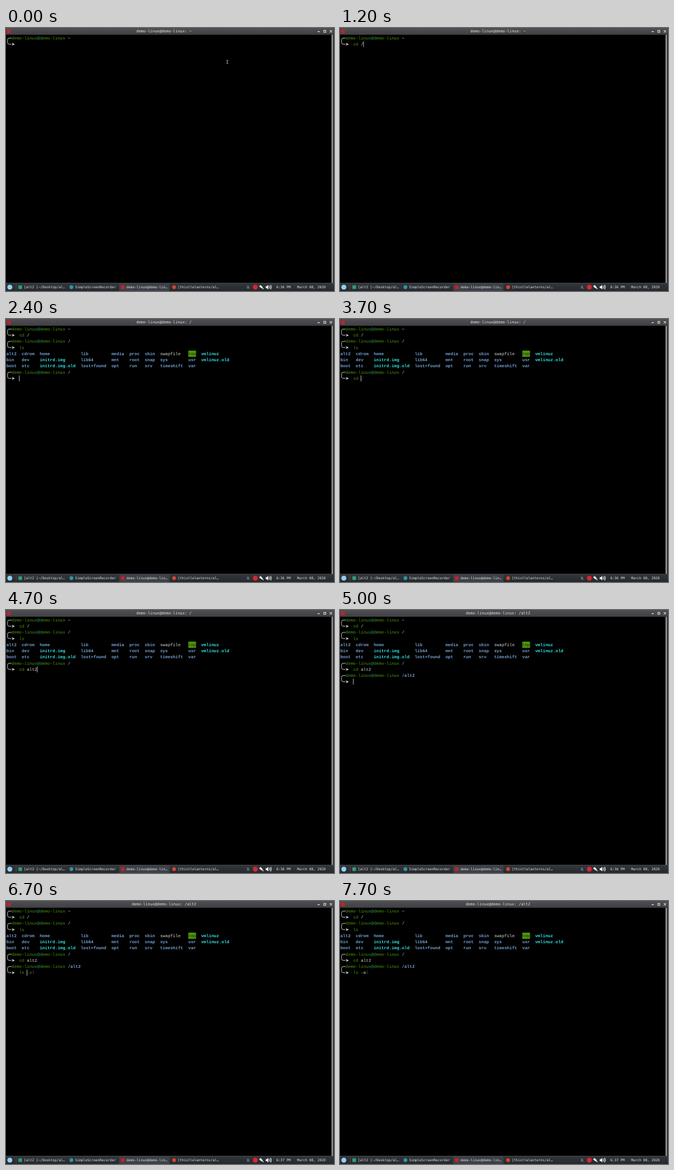
An HTML page that plays this animation: 600x480 px, repeating every 8 s.

```html
<!DOCTYPE html>
<html lang="en">
<head>
<meta charset="utf-8">
<title>Terminal session</title>
<style>
  html, body { margin: 0; width: 100%; height: 100%; overflow: hidden; background: #000; }
  svg { display: block; width: 600px; height: 480px; }
  text { white-space: pre; text-rendering: geometricPrecision; }
  .term { font: 7.8125px "Liberation Mono", monospace; }
  .title { font: 7.008px "DejaVu Sans Mono", monospace; fill: #e6e6e6; }
  .bar { font: 6.229px "DejaVu Sans Mono", monospace; fill: #e4e6e8; }
  .bold { font-weight: bold; }
</style>
</head>
<body>
<svg id="stage" viewBox="0 0 600 480" xmlns="http://www.w3.org/2000/svg">
  <defs>
    <linearGradient id="titleFill" x2="0" y2="1">
      <stop offset="0" stop-color="#505054"/><stop offset="1" stop-color="#3f3f43"/>
    </linearGradient>
    <linearGradient id="barFill" x2="0" y2="1">
      <stop offset="0" stop-color="#34383d"/><stop offset="1" stop-color="#25282c"/>
    </linearGradient>
  </defs>
  <rect width="600" height="480"/>
  <g id="terminal" class="term"></g>

  <rect width="600" height="12.4" fill="url(#titleFill)"/>
  <rect x="2" y="3" width="6.5" height="6.5" fill="#c8202c"/>
  <text id="title" class="title" x="289" y="8.4" text-anchor="middle"></text>
  <g fill="none" stroke="#f0f0f0">
    <path d="M570 6.6h4M592.4 4.2l4 4m0-4l-4 4" stroke-width="1.1"/>
    <rect x="581.4" y="4.3" width="3.6" height="3.6"/>
  </g>
  <rect x="595.4" y="12.4" width="3.4" height="453" fill="#8b8b8d"/>

  <rect y="465" width="600" height="15" fill="url(#barFill)"/>
  <rect y="465" width="600" height=".7" fill="#484c52"/>
  <rect x="207" y="466" width="92" height="14" fill="#3d4147"/>
  <circle cx="7" cy="473" r="4.6" fill="#8fd0f2"/>
  <path d="M18.5 468v10" stroke="#50545a" stroke-width=".8"/>
  <g id="tasks" class="bar"></g>

  <path d="M439.8 475.6q1.2-1 1.2-3.2 0-2.5 1.8-2.5t1.8 2.5q0 2.2 1.2 3.2zM442 476.4h1.8" fill="#65696e"/>
  <path d="M440 470l6 6.5" stroke="#65696e" stroke-width=".8"/>
  <circle cx="456" cy="473" r="4.5" fill="#d92534"/>
  <path d="M463 471.5l2.5-2.5 4.2 4-2.3 2.3z" fill="#f0f0f0"/>
  <path d="M468 473.5l3 3" stroke="#f0f0f0" stroke-width="1.3"/>
  <path d="M475 471.5h1.8l2.8-2.7v8.4l-2.8-2.7H475z" fill="#fff"/>
  <path d="M481 470.8q1.4 2.2 0 4.4M482.7 469.7q2.2 3.3 0 6.6M484.3 468.7q2.7 4.3 0 8.6" fill="none" stroke="#fff" stroke-width=".9"/>
  <text id="clock" class="bar" x="494.6" y="475.2"></text>
  <text class="bar" x="532.4" y="475.2">March 08, 2020</text>

  <g id="pointer" fill="none" stroke="#c9c9c9" stroke-width=".9">
    <path d="M403 58.8q1.8 0 1.8 1v3.8q0 1-1.8 1m3.6-5.8q-1.8 0-1.8 1m0 3.8q0 1 1.8 1"/>
  </g>
</svg>
<script>
const LOOP = 8000, CELL = 4.6875, ROW = 11.25, LEFT = 0.7, TOP = 12.75;
const USER = 'demo-linux@demo-linux';
const C = {
  green: '#4e9a06', red: '#cc0000', teal: '#06989a', blue: '#729fcf',
  cyan: '#34e2e2', fg: '#d3d7cf', hint: '#555753', dark: '#23301a'
};
const INPUT = 5;

// Each key: time, typed text, dim suggestion after it.
const prompts = [
  { row: 0, start: -600, path: '~', keys: [[100, 'c', 'd alt2'], [400, 'cd', ' alt2'], [600, 'cd ', 'alt2'], [800, 'cd /', '']] },
  { row: 2, start: 1300, path: '/', keys: [[1800, 'l', 's'], [2000, 'ls', '']] },
  { row: 7, start: 2400, path: '/', keys: [[3200, 'c', 'd /'], [3500, 'cd', ' /'], [3700, 'cd ', '/'],
    [4000, 'cd a', ''], [4200, 'cd al', ''], [4500, 'cd alt', ''], [4600, 'cd alt2', '']] },
  { row: 9, start: 4900, path: '/alt2', keys: [[6000, 'l', 's'], [6200, 'ls', ''], [6700, 'ls ', '-al'],
    [6900, 'ls -', 'al'], [7100, 'ls -a', 'l']] }
];
const listing = [
  'alt2 cdrom home lib media proc sbin swapfile tmp vmlinuz',
  'bin dev initrd.img lib64 mnt root snap sys usr vmlinuz.old',
  'boot etc initrd.img.old lost+found opt run srv timeshift var'
].map(line => line.split(' '));
const columns = [0, 6, 13, 29, 41, 48, 54, 60, 71, 76];

const $ = id => document.getElementById(id);
const colX = col => LEFT + col * CELL;
const rowY = row => TOP + row * ROW;

function add(parent, tag, attrs, content = '') {
  const node = document.createElementNS('http://www.w3.org/2000/svg', tag);
  for (const key in attrs) node.setAttribute(key, attrs[key]);
  node.textContent = content;
  return parent.appendChild(node);
}

function put(parent, col, row, content, fill, bold = false) {
  return add(parent, 'text', { x: colX(col), y: rowY(row) + 8.1, fill, class: bold ? 'bold' : '' }, content);
}

function show(node, on) {
  node.setAttribute('visibility', on ? 'visible' : 'hidden');
}

const terminal = $('terminal');

for (const p of prompts) {
  const g = p.group = add(terminal, 'g', {});
  const y = rowY(p.row) + ROW / 2;
  add(g, 'path', {
    d: `M10 ${y}H6q-3.2 0-3.2 3.2v${ROW - 6.4}q0 3.2 3.2 3.2h4`,
    fill: 'none', stroke: C.fg, 'stroke-width': 0.95
  });
  add(g, 'path', { d: `M10.6 ${y + ROW - 2.7}l5.5 2.7-5.5 2.7 1.4-2.7z`, fill: C.fg });
  const at = USER.indexOf('@');
  put(g, 2, p.row, USER.slice(0, at), C.green);
  put(g, 2 + at, p.row, '@', C.teal);
  put(g, 3 + at, p.row, USER.slice(at + 1), C.green);
  put(g, 3 + USER.length, p.row, p.path, C.blue, true);
  p.command = put(g, INPUT, p.row + 1, '', C.green);
  p.args = put(g, INPUT + 2, p.row + 1, '', C.fg);
  p.hint = put(g, INPUT, p.row + 1, '', C.hint);
}

const output = add(terminal, 'g', {});
listing.forEach((names, i) => names.forEach((name, j) => {
  const row = 4 + i, col = columns[j];
  if (name === 'tmp') {
    add(output, 'rect', { x: colX(col), y: rowY(row), width: 3 * CELL, height: ROW, fill: C.green });
    put(output, col, row, name, C.dark);
  } else if (name === 'swapfile') {
    put(output, col, row, name, C.fg);
  } else {
    put(output, col, row, name, /^(initrd|vmlinuz)/.test(name) ? C.cyan : C.blue, true);
  }
}));
const caret = add(terminal, 'rect', { width: 0.9, height: ROW - 0.4, fill: C.fg });

[
  ['[alt2 [~/Desktop/al…', 26, '#2f9d80', 'rect'],
  ['SimpleScreenRecorder', 119.6, '#2a9aa5', 'circle'],
  [USER.slice(0, 19) + '…', 213.5, '#c8202c', 'rect'],
  ['[thistlelanterns/al…', 307.5, '#d6452f', 'circle']
].forEach(([label, x, fill, shape]) => {
  add($('tasks'), shape, shape === 'rect'
    ? { x: x - 3.3, y: 469.7, width: 6.6, height: 6.6, fill }
    : { cx: x, cy: 473, r: 3.4, fill });
  add($('tasks'), 'text', { x: x + 6.8, y: 475.2 }, label);
});

function render(t) {
  let active, lastEvent, typedLength;
  for (const p of prompts) {
    const visible = t >= p.start;
    show(p.group, visible);
    if (!visible) continue;
    const [time, typed, hint] = p.keys.filter(key => t >= key[0]).pop() || [p.start, '', ''];
    const unknown = typed === 'c';
    p.command.textContent = typed.slice(0, 2);
    p.command.setAttribute('fill', unknown ? C.red : C.green);
    p.command.setAttribute('class', unknown ? 'bold' : '');
    p.args.textContent = typed.slice(2);
    p.hint.textContent = hint;
    p.hint.setAttribute('x', colX(INPUT + typed.length));
    active = p;
    lastEvent = time;
    typedLength = typed.length;
  }
  show(output, t >= 2400);
  show(caret, t - lastEvent < 500);
  caret.setAttribute('x', colX(INPUT + typedLength) - 0.3);
  caret.setAttribute('y', rowY(active.row + 1) + 0.2);
  show($('pointer'), t < 100);
  $('title').textContent = `${USER}: ${active.path}`;
  $('clock').textContent = t < 5500 ? '6:36 PM' : '6:37 PM';
}

const began = performance.now();
function tick() {
  render((performance.now() - began) % LOOP);
  requestAnimationFrame(tick);
}
tick();
</script>
</body>
</html>
```
